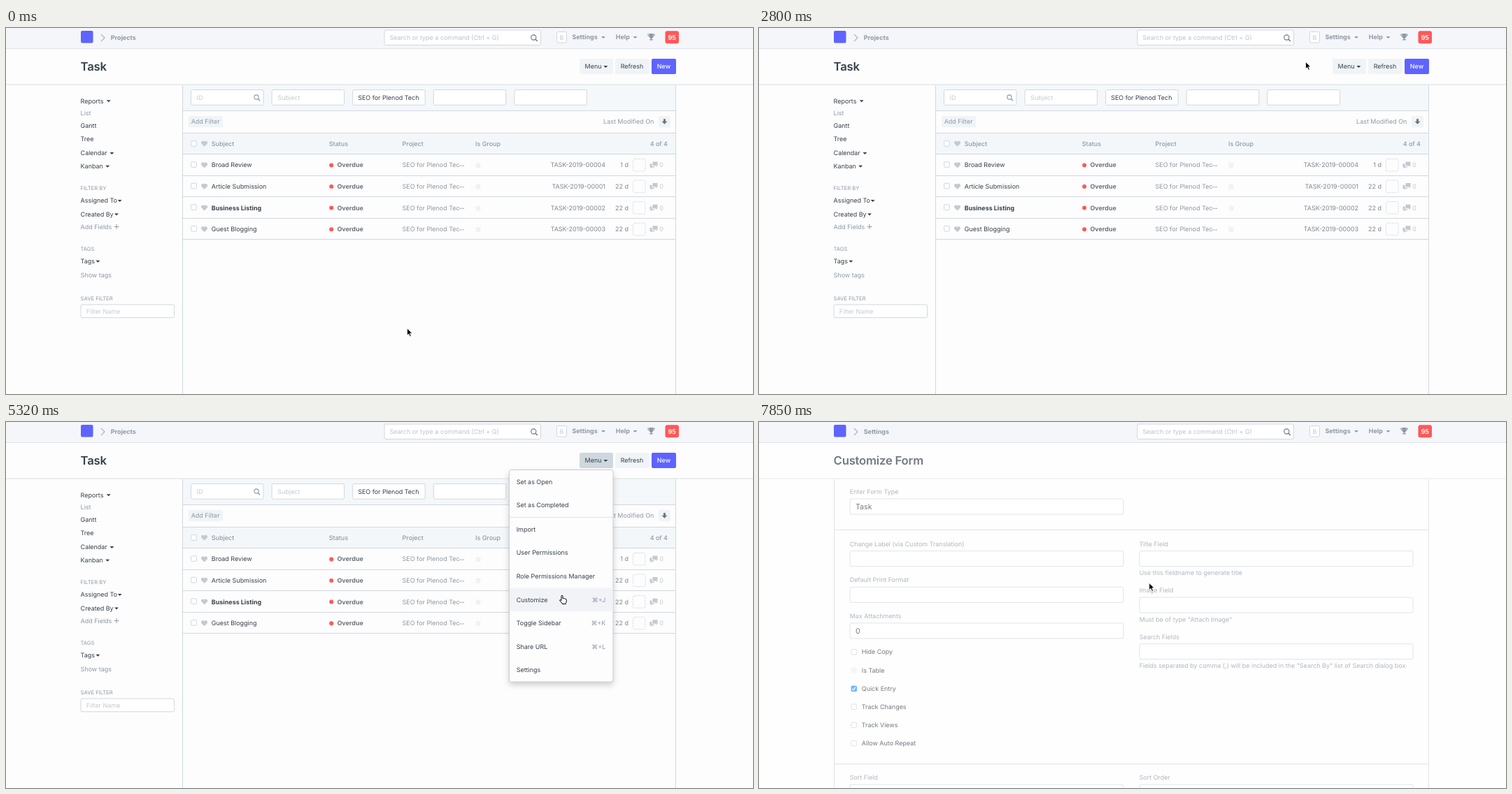
An HTML page for the animation above (8000 ms loop, 1068 px wide and 524 px high).

```html
<!DOCTYPE html>
<html lang="en">
<head>
<meta charset="utf-8">
<style>
  html, body { margin: 0; width: 100%; height: 100%; overflow: hidden; background: #fdfdfd; }
  svg { display: block; }
  text { font-family: Inter, "Open Sans", sans-serif; text-rendering: geometricPrecision; white-space: pre; }
</style>
</head>
<body>
<svg id="stage" width="1068" height="524" viewBox="0 0 1068 524"></svg>
<script>
const INK = '#36414c', MUTED = '#8d99a6', PALE = '#c3cad1', LINE = '#d1d8dd',
      BUTTON = '#f0f4f7', BLUE = '#5e64ff', RED = '#ff5858', PAGE = '#fdfdfd';
const LOOP = 8000;

// Text is placed by the middle of its capitals.
const text = (x, cy, str, { fill = INK, size = 8.96, weight = 400, anchor = 'start', spacing = 0 } = {}) =>
  `<text x="${x}" y="${cy + size * 0.364}" fill="${fill}" font-size="${size}" font-weight="${weight}"
    text-anchor="${anchor}" letter-spacing="${spacing}">${str}</text>`;
const muted = (x, cy, str, more) => text(x, cy, str, { fill: MUTED, ...more });
const box = (x, y, w, h, fill, stroke = 'none', r = 2, more = '') =>
  `<rect x="${x}" y="${y}" width="${w}" height="${h}" rx="${r}" fill="${fill}" stroke="${stroke}" ${more}/>`;
const path = (d, fill = 'none', stroke = 'none', more = '') =>
  `<path d="${d}" fill="${fill}" stroke="${stroke}" ${more}/>`;
const hline = (x, y, w, color = LINE) => path(`M${x} ${y}h${w}`, 'none', color);
const vline = (x, y, h) => path(`M${x} ${y}v${h}`, 'none', LINE);
const input = (x, y, w, h = 22) => box(x, y, w, h, '#fff', LINE);
const caret = (x, y, fill = INK) => path(`M${x - 3} ${y - 1}h6l-3 3z`, fill);
const checkbox = (x, y) => box(x, y, 7.6, 7.6, '#fff', '#c5cdd4', 1, 'stroke-width=".8"');
const heart = (x, y) => path(`M${x} ${y + 4.2}l-4-4a2.4 2.4 0 0 1 4-3a2.4 2.4 0 0 1 4 3z`, PALE);
const lens = (x, y, r, color) =>
  `<circle cx="${x}" cy="${y}" r="${r}" fill="none" stroke="${color}" stroke-width="1.1"/>` +
  path(`M${x + r * 0.7} ${y + r * 0.7}l3 3`, 'none', color, 'stroke-width="1.4"');
const group = (id, content) => `<g id="${id}">${content}</g>`;

function navbar() {
  const bold = { weight: 700 };
  return box(0, 0, 1068, 29, '#f5f6fa', 'none', 0) + hline(0, 29.5, 1068, '#dfe3e7') +
    box(107, 4, 17.5, 17.5, BLUE) +
    path('M136 9l5 5l-5 5', 'none', '#a9b2bb', 'stroke-width="1.1"') +
    `<text id="crumb" x="149.7" y="17" fill="${MUTED}" font-size="8.96" font-weight="700"></text>` +
    box(541, 3, 223.5, 21.5, '#fff', LINE, 2, 'id="search"') +
    text(548.5, 13.8, 'Search or type a command (Ctrl + G)', { fill: '#bcc3ca' }) +
    box(548.6, 8, 1, 12, INK, 'none', 0, 'id="textCaret"') +
    lens(754.3, 13.5, 3.6, '#6c7680') +
    box(787.5, 5.5, 14, 15.5, '#fff', LINE) + text(794.5, 13.5, 'B', { fill: PALE, anchor: 'middle' }) +
    muted(809.4, 13.2, 'Settings', bold) + caret(854, 13, MUTED) +
    muted(871.7, 13.2, 'Help', bold) + caret(899.5, 13, MUTED) +
    path('M919.5 8h6v3.5q-.5 3-2.2 3.5v1.3h1.7v1.2h-5v-1.2h1.7v-1.3q-1.7-.5-2.2-3.5z', MUTED) +
    path('M919.5 9h-1.8q0 3 2.6 3.5M925.5 9h1.8q0 3-2.6 3.5', 'none', MUTED) +
    box(942.5, 4.3, 19.5, 18, RED, 'none', 3) +
    text(952.2, 13.3, '95', { fill: '#fff', weight: 600, size: 9.3, anchor: 'middle' });
}

const heading = str =>
  text(106.6, 55.2, str, { size: 16.7, weight: 600, spacing: -0.22 }) + hline(0, 81, 1068, '#d8dde1');

function sidebar() {
  const small = { size: 7.6 };
  const links = [['Reports', 104.3, 146.7], ['Gantt', 140.2], ['Tree', 158.7], ['Calendar', 179, 151.4],
    ['Kanban', 197.8, 145.2], ['Assigned To', 247, 162.6], ['Created By', 266.4, 158], ['Tags', 333.8, 131.3]];
  return links.map(([str, y, cx]) => text(106.6, y, str) + (cx ? caret(cx, y) : '')).join('') +
    muted(106.6, 122.2, 'List') + muted(106.6, 284.3, 'Add Fields') +
    path('M154.5 284.5h7M158 281v7', 'none', MUTED) + muted(106.6, 353.4, 'Show tags') +
    muted(106.6, 229.7, 'FILTER BY', small) + muted(106.6, 316.2, 'TAGS', small) +
    muted(106.6, 387.2, 'SAVE FILTER', small) +
    input(107, 396, 133.5, 18.8) + text(114.8, 405.6, 'Filter Name', { fill: PALE });
}

function taskRow([subject, id, age, weight], i) {
  const y = 196.2 + 30.6 * i, end = { anchor: 'end' };
  return checkbox(264.7, y - 4.5) + heart(283.6, y) + text(293.8, y, subject, { weight }) +
    `<circle cx="465.2" cy="${y + .2}" r="3" fill="${RED}"/>` +
    text(473.4, y, 'Overdue', { fill: '#6c7680', weight: 700 }) +
    muted(566.6, y, 'SEO for Plenod Tec') +
    [648.5, 651, 653.5].map(x => box(x, y + .2, 1.5, 1.5, MUTED, 'none', 0.7)).join('') +
    box(671.5, y - 3, 7, 7, '#f0f2f4', 'none', 1) +
    text(857, y, 'TASK-2019-0000' + id, { fill: '#7d8894', ...end }) +
    text(890, y, age + ' d', { fill: '#7d8894', ...end }) +
    box(896.5, y - 8.7, 17.5, 17.5, 'none', LINE, 2, 'stroke-dasharray="2 1.4"') +
    path(`M924.5 ${y - 4.7}h7v5.5h-1v2l-2-2h-4z`, PALE) +
    path(`M920.5 ${y - 2}h3v3.8h3.5v1.5h-3l-2 2v-2h-1.5z`, PALE) +
    text(934.2, y, '0', { fill: PALE }) + hline(253, Math.round(y + 14.3) + .5, 704);
}

function taskPage() {
  const rows = [['Broad Review', 4, 1], ['Article Submission', 1, 22],
    ['Business Listing', 2, 22, 700], ['Guest Blogging', 3, 22]];
  const columns = [[293.8, 'Subject'], [461.8, 'Status'], [566.6, 'Project'], [671, 'Is Group']];
  return heading('Task') + sidebar() +
    box(820, 44, 48, 22, BUTTON, 'none', 2, 'id="menuButton"') + text(827.6, 55.2, 'Menu') + caret(857.3, 55) +
    box(871, 44, 48.5, 22, BUTTON) + text(878.7, 55.2, 'Refresh') +
    box(923, 44, 35, 22, BLUE) + text(930.8, 55.2, 'New', { fill: '#fff', weight: 500 }) +
    box(253, 82, 704, 36, '#f4f8fb', 'none', 0) + box(253, 151, 704, 29, '#f4f7fa', 'none', 0) +
    [118.5, 150.5, 180.5].map(y => hline(253, y, 704)).join('') +
    vline(252.5, 82, 442) + vline(957.5, 82, 442) +
    [0, 1, 2, 3, 4].map(i => input(264.5 + 115.6 * i, 88.5, 103.5, 21.8)).join('') +
    text(272.5, 99.8, 'ID', { fill: PALE }) + lens(358, 99, 3.1, MUTED) +
    text(388.2, 99.8, 'Subject', { fill: PALE }) + text(503.2, 99.8, 'SEO for Plenod Tech') +
    box(261, 126, 49, 16.3, BUTTON) + muted(264.7, 134.2, 'Add Filter') +
    muted(926.3, 134.2, 'Last Modified On', { anchor: 'end' }) + box(933, 126, 17, 16.3, BUTTON) +
    path('M940 130.3h3v3.4h2.5l-4 4l-4-4h2.5z', '#6c7680') +
    checkbox(264.7, 161.7) + heart(283.6, 165.6) +
    columns.map(([x, str]) => muted(x, 165.7, str, { weight: 500 })).join('') +
    muted(946, 165.7, '4 of 4', { anchor: 'end', weight: 500 }) +
    rows.map(taskRow).join('');
}

const MENU = [['Set as Open', 85.5], ['Set as Completed', 119], ['Import', 153.5], ['User Permissions', 187],
  ['Role Permissions Manager', 220.6], ['Customize', 254.3, 'J'], ['Toggle Sidebar', 288, 'K'],
  ['Share URL', 321.5, 'L'], ['Settings', 355]];

const menu = () =>
  box(719.5, 68.5, 148.5, 303.5, PAGE, '#c9cdd1', 3, 'style="filter:drop-shadow(0 4px 4px rgba(0,0,0,.18))"') +
  box(720, 0, 147.5, 33.5, '#f1f3f7', 'none', 0, 'id="hover"') + hline(720, 136.5, 147.5, '#dfe3e7') +
  MENU.map(([str, y, key]) => text(729.7, y, str) +
    (key ? muted(857.3, y, '⌘+' + key, { anchor: 'end' }) : '')).join('');

const field = (x, cy, label, value = '') =>
  muted(x - .3, cy, label) + input(x, cy + 10.3, 391, 22) + text(x + 8, cy + 21.8, value, { size: 10.7 });

const emptyForm = () => box(107.5, 81, 850, 74, PAGE, LINE, 0) + hline(107, 155.5, 851, '#c6ccd1') +
  field(130, 99.7, 'Enter Form Type');

function fullForm() {
  const checks = ['Hide Copy', 'Is Table', 'Quick Entry', 'Track Changes', 'Track Views', 'Allow Auto Repeat'];
  return vline(107.5, 82, 442) + vline(957.5, 82, 442) + hline(107, 154.5, 851) + hline(107, 489.5, 851) +
    field(130, 99.7, 'Enter Form Type', 'Task') +
    field(130, 174.4, 'Change Label (via Custom Translation)') +
    field(130, 226, 'Default Print Format') + field(130, 277.6, 'Max Attachments', '0') +
    field(544, 174.4, 'Title Field') + muted(543.7, 216, 'Use this fieldname to generate title') +
    field(544, 240.8, 'Image Field') + muted(543.7, 282.4, 'Must be of type "Attach Image"') +
    field(544, 307.3, 'Search Fields') +
    muted(543.7, 348.8, 'Fields separated by comma (,) will be included in the "Search By" list of Search dialog box') +
    field(130, 508.8, 'Sort Field') + field(544, 508.8, 'Sort Order') +
    checks.map((str, i) => {
      const y = 329.2 + 26.15 * i;
      const mark = i === 1 ? box(131.7, y - 3.8, 8, 8, '#eef0f2', 'none', 1)
        : i === 2 ? box(131.5, y - 4, 8.5, 8.5, '#3b99fc', 'none', 1.5) +
          path(`M133.3 ${y + .3}l1.7 1.9l3.2-4.2`, 'none', '#fff', 'stroke-width="1.2"')
        : checkbox(131.8, y - 3.7);
      return mark + text(146.8, y, str);
    }).join('');
}

const formPage = () => heading('Customize Form') + group('emptyForm', emptyForm()) +
  group('fullForm', fullForm() + box(0, 30, 1068, 494, PAGE, 'none', 0, 'opacity=".3"'));

const cursor = () =>
  group('arrow', path('M0 0v10l2.3-2.1l1.7 3.8l1.8-.8l-1.7-3.7h3.2z', '#000', '#fff', 'stroke-width=".8"')) +
  group('hand', path('M3 6.5V1.3q0-1 1-1t1 1V4.6q1.3-.7 1.9.3q1.2-.6 1.8.5q1.5-.3 1.5 1.1v2.6q0 1.2-.9 2.2v1.2H4.2v-1L.8 7.9q-.6-1 .3-1.4q.8-.2 1.9 1.2z',
    '#fff', '#000', 'stroke-width="1" stroke-linejoin="round"'));

stage.innerHTML = navbar() + group('taskPage', taskPage() + group('menu', menu())) +
  group('formPage', formPage()) + group('cursor', cursor());

// Pointer stops: time, x, y
const STOPS = [[0, 573.5, 430], [600, 580, 418], [750, 615, 350], [900, 685, 235], [1050, 765, 125], [1200, 822, 66],
  [1350, 836.5, 52], [2210, 812, 50], [2360, 781.5, 48.5],
  [3100, 812, 55], [3250, 847, 65.5], [3840, 838, 95], [3990, 800, 155], [4130, 760, 210],
  [4280, 742, 235], [4580, 760, 285], [4730, 737, 331], [5020, 752, 312], [5170, 777, 272],
  [5320, 791, 248], [5760, 720, 243], [5910, 610, 235], [6060, 557.8, 230.5]];

const $ = id => document.getElementById(id);
const show = (id, on) => { $(id).style.display = on ? '' : 'none'; };

function render(t) {
  const between = (a, b) => t >= a && t < b;
  const [, x, y] = STOPS.findLast(stop => stop[0] <= t);
  const onForm = t >= 6810, loaded = t >= 7850, focused = between(1200, 2800), pointing = between(3250, 5760);

  $('cursor').setAttribute('transform', `translate(${x} ${y})`);
  show('hand', pointing);
  show('arrow', !pointing);
  show('taskPage', !onForm);
  show('formPage', onForm);
  show('emptyForm', !loaded);
  show('fullForm', loaded);
  $('crumb').textContent = onForm ? 'Settings' : 'Projects';
  $('search').setAttribute('stroke', focused ? '#b4bcc4' : LINE);
  show('textCaret', between(1200, 1920) || between(2360, 2800));
  $('menuButton').setAttribute('fill', pointing ? '#cfd8df' : BUTTON);
  show('menu', between(3550, 5760));

  const item = MENU.find(([, cy]) => Math.abs(y + 1 - cy) < 16.8);
  show('hover', item);
  if (item) $('hover').setAttribute('y', item[1] - 16.8);
}

const start = performance.now();
(function tick() {
  render((performance.now() - start) % LOOP);
  requestAnimationFrame(tick);
})();
</script>
</body>
</html>
```
